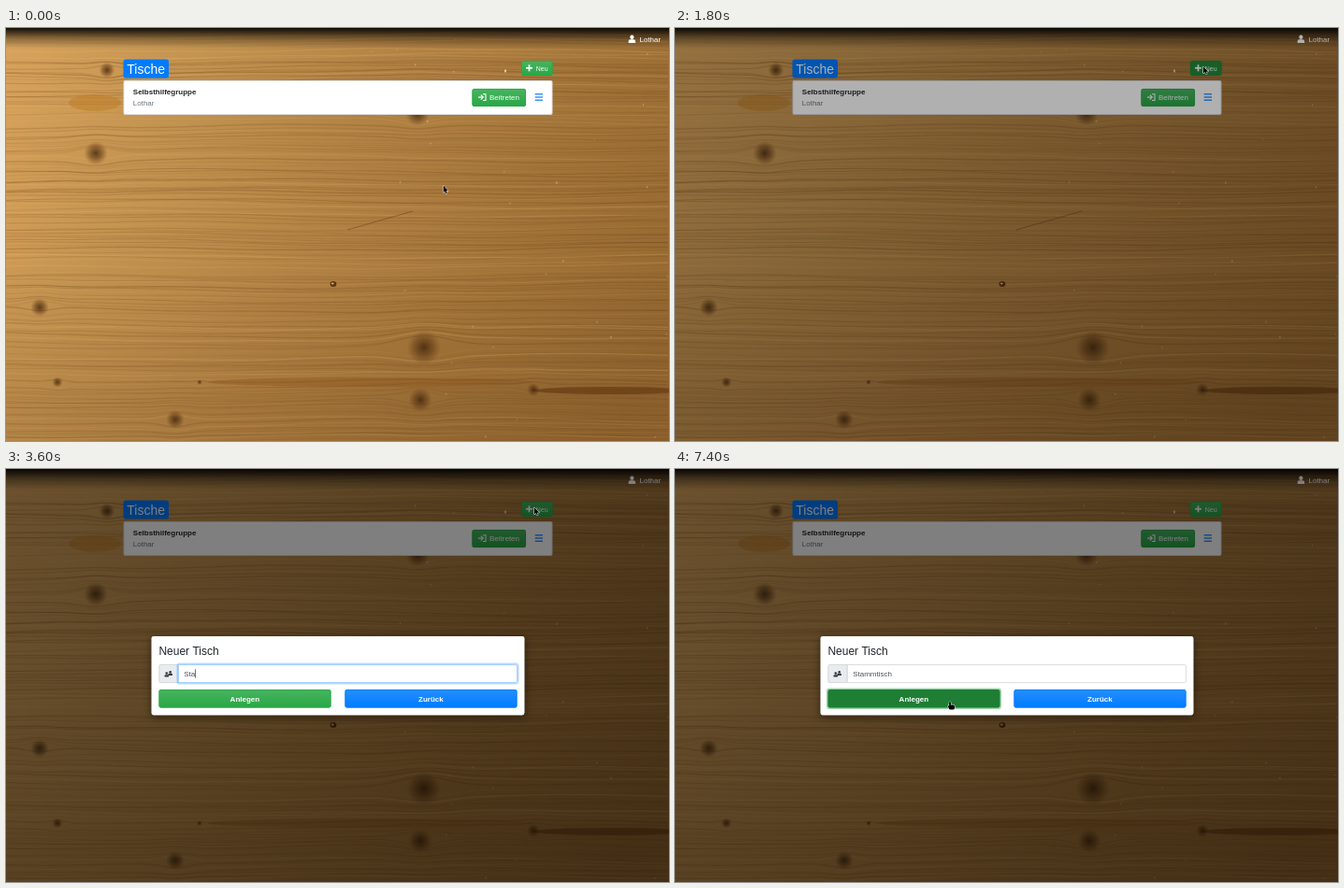
An HTML page with a canvas that plays this animation: 709x442 px, repeating every 8000 ms.

```html
<!DOCTYPE html>
<html lang="de">
<head>
<meta charset="utf-8">
<title>Tische</title>
<style>
html, body { margin: 0; width: 100%; height: 100%; overflow: hidden; background: #000; }
canvas { display: block; }
</style>
</head>
<body>
<canvas id="stage" width="709" height="442"></canvas>
<script>
const W = 709, H = 442, LOOP = 8000, STEP = 200;
const SANS = '"Liberation Sans", Arial, sans-serif';
const USER = 'Lothar';
const GREEN = { top: '#48b461', base: '#28a745', hover: '#218838', active: '#1e7e34', ring: 'rgba(72,180,97,.5)' };
const BLUE = { top: '#268fff', base: '#007bff' };
const stage = document.getElementById('stage').getContext('2d');

function makeLayer() {
  const c = document.createElement('canvas');
  c.width = W;
  c.height = H;
  return c.getContext('2d');
}

function randomizer(seed) {
  return () => (seed = (seed * 16807) % 2147483647) / 2147483647;
}

// Colours are spread evenly from the first point to the second.
function blend(g, x0, y0, x1, y1, ...colors) {
  const gradient = g.createLinearGradient(x0, y0, x1, y1);
  colors.forEach((c, i) => gradient.addColorStop(i / (colors.length - 1), c));
  return gradient;
}

function box(g, x, y, w, h, r, fill, border) {
  g.beginPath();
  g.roundRect(x, y, w, h, r);
  g.fillStyle = fill;
  g.fill();
  if (!border) return;
  g.beginPath();
  g.roundRect(x + .4, y + .4, w - .8, h - .8, r);
  g.lineWidth = .8;
  g.strokeStyle = border;
  g.stroke();
}

function ring(g, x, y, w, h, color) {
  g.beginPath();
  g.roundRect(x - .8, y - .8, w + 1.6, h + 1.6, 2.6);
  g.lineWidth = 1.6;
  g.strokeStyle = color;
  g.stroke();
}

function text(g, str, x, y, size, color, weight = 'normal', align = 'left') {
  g.font = `${weight} ${size}px ${SANS}`;
  g.textAlign = align;
  g.fillStyle = color;
  g.fillText(str, x, y);
}

function line(g, color, width, ...pts) {
  g.beginPath();
  for (let i = 0; i < pts.length; i += 2) g.lineTo(pts[i], pts[i + 1]);
  g.strokeStyle = color;
  g.lineWidth = width;
  g.stroke();
}

function ellipse(g, x, y, rx, ry, color) {
  g.beginPath();
  g.ellipse(x, y, rx, ry, 0, 0, 7);
  g.fillStyle = color;
  g.fill();
}

function button(g, x, y, w, h, theme, state) {
  const fill = theme[state] || blend(g, 0, y, 0, y + h, theme.top, theme.base);
  box(g, x, y, w, h, 2, fill, theme[state] || theme.base);
}

function person(g, x, y, s, color) {
  ellipse(g, x, y, 2.1 * s, 2.2 * s, color);
  g.beginPath();
  g.roundRect(x - 3.8 * s, y + 2.5 * s, 7.6 * s, 3.6 * s, [2.2 * s, 2.2 * s, .6, .6]);
  g.fill();
}

// x, y, radius
const KNOTS = [
  [108, 45, 6], [96, 134, 9], [36, 299, 7], [447, 342, 13], [443, 398, 9],
  [55, 379, 4], [181, 419, 7], [440, 92, 9], [564, 387, 5], [207, 379, 2]
];

function paintKnot(g, x, y, r) {
  const shade = g.createRadialGradient(x, y, 0, x, y, r * 1.4);
  shade.addColorStop(0, 'rgba(52,28,8,.75)');
  shade.addColorStop(.5, 'rgba(84,48,14,.5)');
  shade.addColorStop(1, 'rgba(96,56,18,0)');
  ellipse(g, x, y, r * 1.4, r * 1.4, shade);
}

function paintGrain(g) {
  const rnd = randomizer(77);
  const bend = (x, y) => KNOTS.reduce((sum, [kx, ky, r]) =>
    sum + r * .75 * Math.sign(y - ky) *
    Math.exp(-(((x - kx) / (r * 2.8)) ** 2) - Math.abs(y - ky) / (r * 2)), 0);

  for (let y = 4; y < H; y += 1.4 + rnd() * 3.2) {
    const phase = rnd() * 6, slope = (rnd() - .5) * 8, pts = [];
    for (let x = 0; x <= W; x += 6) {
      const wave = 2 * Math.sin(x / 110 + y / 60) + .7 * Math.sin(x / 37 + phase);
      pts.push(x, y + wave + slope * (x / W - .5) + bend(x, y));
    }
    const tone = rnd() < .35 ? '236,188,114' : '98,56,16';
    line(g, `rgba(${tone},${.08 + rnd() * .17})`, .6 + rnd() * .9, ...pts);
  }
  for (let i = 0; i < 30; i++) {
    ellipse(g, W * (.55 + rnd() * .45), H * rnd(), .5 + rnd() * .5, .6 + rnd(), 'rgba(228,208,172,.4)');
  }
}

function paintWood() {
  const g = makeLayer();
  g.fillStyle = blend(g, 0, 0, W, 300, '#d8a35c', '#c39350', '#b38345', '#a3753a', '#966932');
  g.fillRect(0, 0, W, H);
  paintGrain(g);

  ellipse(g, 95, 80, 28, 9, 'rgba(192,126,40,.55)');
  ellipse(g, 390, 379, 174, 5, 'rgba(140,84,26,.35)');
  ellipse(g, 645, 388, 82, 4, 'rgba(94,50,14,.55)');
  line(g, 'rgba(95,52,18,.5)', .9, 365, 216, 435, 196);
  for (const knot of KNOTS) paintKnot(g, ...knot);
  ellipse(g, 350, 274, 3.4, 3, '#5a3612');
  ellipse(g, 349.3, 273.5, 1.3, 1, '#dfb981');
  ellipse(g, 534, 46, 1, 1.8, '#e3d3b8');

  g.fillStyle = blend(g, 0, H * .55, 0, H, 'rgba(70,38,8,0)', 'rgba(70,38,8,.16)');
  g.fillRect(0, 0, W, H);
  g.fillStyle = blend(g, 0, 0, 0, 22, 'rgba(0,0,0,.92)', 'rgba(0,0,0,.36)', 'rgba(0,0,0,0)');
  g.fillRect(0, 0, W, 22);
  return g.canvas;
}

function drawPage(g, newState) {
  g.drawImage(wood, 0, 0);
  person(g, 669.4, 9.8, 1, '#fff');
  text(g, USER, 677.5, 15, 8, '#fff');

  box(g, 125.5, 33.5, 48.5, 20, 2.5, '#007bff');
  text(g, 'Tische', 129.3, 48.6, 14, '#fff');

  button(g, 551, 35, 33.5, 16, GREEN, newState);
  line(g, '#fff', 1.7, 556, 42.8, 563, 42.8);
  line(g, '#fff', 1.7, 559.5, 39.3, 559.5, 46.3);
  text(g, 'Neu', 566.8, 45.6, 7, '#fff');

  box(g, 125.5, 56, 459, 37, 2, '#fff', 'rgba(0,0,0,.2)');
  text(g, 'Selbsthilfegruppe', 135.8, 71, 8, '#212529', 'bold');
  text(g, USER, 135.8, 83, 8, '#6c757d');

  button(g, 498.5, 65, 57.5, 19, GREEN);
  line(g, '#fff', 1.1, 510, 70.7, 513, 70.7, 513, 77.5, 510, 77.5);
  line(g, '#fff', 1.2, 505, 74.1, 510, 74.1);
  line(g, '#fff', 1.2, 507.8, 71.6, 510.3, 74.1, 507.8, 76.6);
  text(g, 'Beitreten', 517, 77, 8, '#fff');
  for (let i = -1; i <= 1; i++) line(g, '#007bff', 1.2, 565.7, 74 + i * 3.2, 574, 74 + i * 3.2);
}

function drawDialog(g, { typed, caret, focus, state, pressRing }) {
  g.clearRect(0, 0, W, H);
  g.save();
  g.shadowColor = 'rgba(0,0,0,.5)';
  g.shadowBlur = 8;
  g.shadowOffsetY = 2;
  box(g, 155.5, 179, 399, 84.5, 2.4, '#fff');
  g.restore();
  text(g, 'Neuer Tisch', 163.4, 198.7, 12, '#212529');

  box(g, 163.5, 209, 21, 20, [2, 0, 0, 2], '#e9ecef', '#ced4da');
  person(g, 175.7, 217.3, .62, '#343a40');
  person(g, 171.8, 218.6, .62, '#343a40');
  box(g, 184, 209, 363, 20, [0, 2, 2, 0], '#fff', '#ced4da');
  if (focus) {
    g.globalAlpha = focus;
    ring(g, 184, 209, 363, 20, 'rgba(0,123,255,.25)');
    box(g, 184, 209, 363, 20, [0, 2, 2, 0], '#fff', '#80bdff');
    g.globalAlpha = 1;
  }
  text(g, typed || 'Mein neuer Tisch', 190.2, 221.7, 8, typed ? '#495057' : '#6c757d');
  if (caret) {
    const x = 190.5 + (typed ? g.measureText(typed).width : 0);
    line(g, '#343a40', .7, x, 214.3, x, 223.7);
  }

  button(g, 163.5, 236, 184, 19.5, GREEN, state);
  if (pressRing) {
    g.globalAlpha = pressRing;
    ring(g, 163.5, 236, 184, 19.5, GREEN.ring);
    g.globalAlpha = 1;
  }
  button(g, 362.5, 236, 184, 19.5, BLUE);
  text(g, 'Anlegen', 255.4, 248.6, 8, '#fff', 'bold', 'center');
  text(g, 'Zurück', 454.4, 248.6, 8, '#fff', 'bold', 'center');
}

function arrowShape() {
  const p = new Path2D('M0 0V7.6L1.7 6.1 2.9 8.7 4 8.2 2.9 5.7H5.2Z');
  return p;
}

function handShape() {
  const p = new Path2D();
  p.roundRect(-.8, 0, 1.7, 6, .8);
  p.roundRect(-1.2, 3.4, 6.2, 5, 1.6);
  p.ellipse(-1.2, 5.4, 1.3, 1, .8, 0, 7);
  return p;
}

function drawPointer(g, [x, y], hand) {
  const shape = hand ? handShape() : arrowShape();
  g.save();
  g.translate(x, y);
  g.lineJoin = 'round';
  g.strokeStyle = '#fff';
  g.lineWidth = 1;
  g.stroke(shape);
  g.fillStyle = '#000';
  g.fill(shape);
  g.restore();
}

function glide(from, via, to, u) {
  u = Math.min(1, Math.max(0, u));
  u = u * u * (3 - 2 * u);
  return from.map((a, i) => (1 - u) ** 2 * a + 2 * u * (1 - u) * via[i] + u * u * to[i]);
}

function pointerAt(t) {
  return t < 6000
    ? glide([467.7, 168.6], [660, 92], [565, 41], t / 1200)
    : glide([565, 41], [440, 150], [294, 249], (t - 6000) / 1000);
}

function typedAt(t) {
  const keys = t < 3000 ? 0
    : t < 4800 ? Math.min(5, Math.max(1, Math.floor((t - 3000) / 200)))
    : t < 5200 ? 7 : 10;
  return 'Stammtisch'.slice(0, keys);
}

function render(t) {
  const onNew = t >= 1000 && t < 1800, onCreate = t >= 7000;
  drawPage(stage, t >= 1400 && t < 1800 ? 'active' : t >= 1000 && t < 2000 ? 'hover' : '');
  if (t >= 1800) {
    stage.fillStyle = `rgba(0,0,0,${t < 2000 ? .31 : .5})`;
    stage.fillRect(0, 0, W, H);
  }
  if (t >= 2000) {
    const entering = t < 2200;
    drawDialog(dialog, {
      typed: typedAt(t),
      caret: t >= 2400 && t < 5800,
      focus: t < 2200 || t >= 7200 ? 0 : t < 2400 ? .3 : 1,
      state: t >= 7200 ? 'active' : onCreate ? 'hover' : '',
      pressRing: t >= 7400 ? 1 : t >= 7200 ? .4 : 0
    });
    stage.globalAlpha = entering ? .79 : 1;
    stage.drawImage(dialog.canvas, 0, entering ? -11.5 : 0);
    stage.globalAlpha = 1;
  }
  drawPointer(stage, pointerAt(t), onNew || onCreate);
}

const wood = paintWood(), dialog = makeLayer();
const start = performance.now();
function tick() {
  const t = (performance.now() - start) % LOOP;
  render(Math.floor(t / STEP) * STEP);
  requestAnimationFrame(tick);
}
tick();
</script>
</body>
</html>
```
